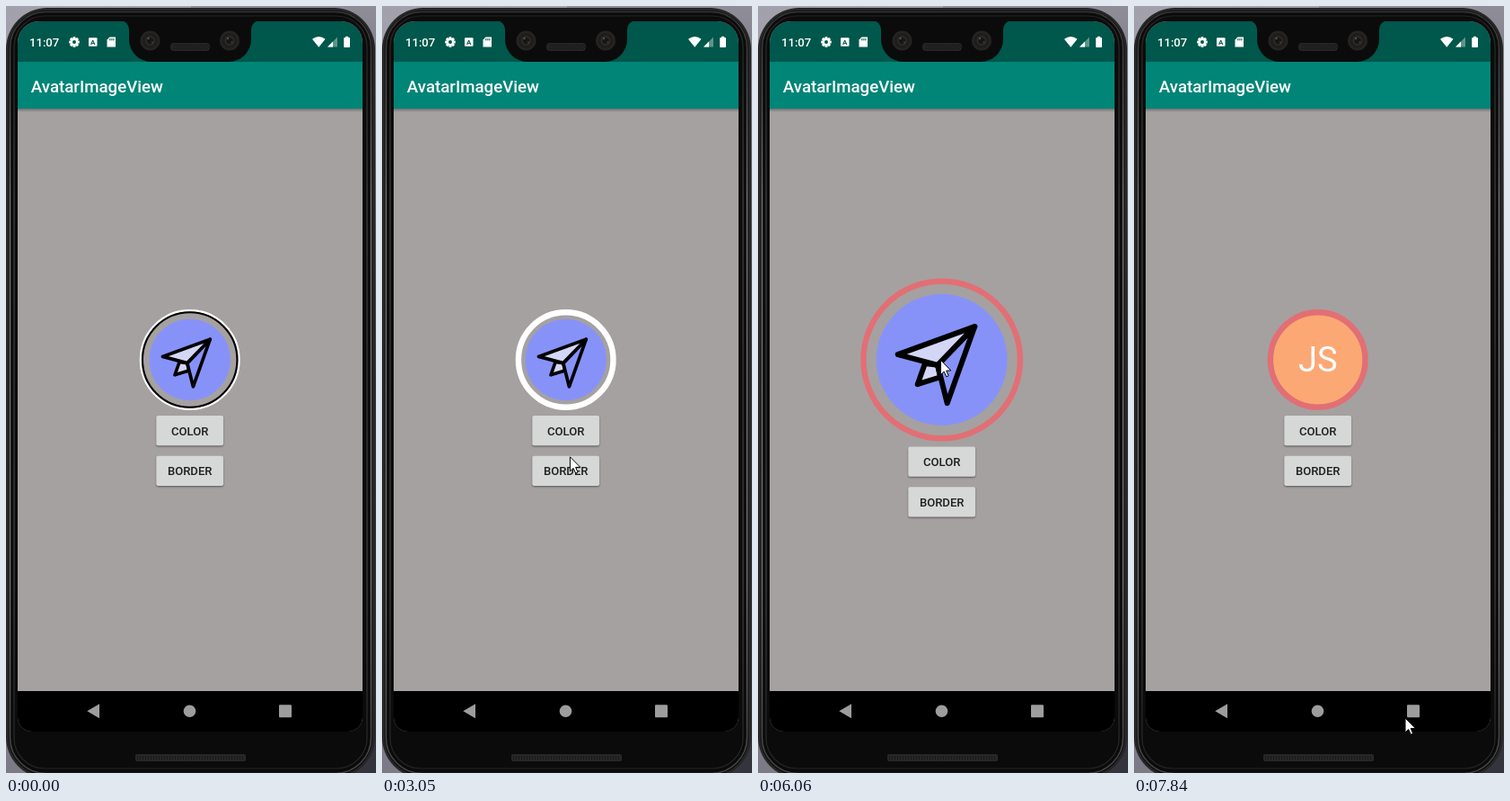
Write an HTML page with a canvas that moves like this. It is 412 px wide and 852 px high and loops after 8000 ms.

```html
<!DOCTYPE html>
<html lang="en">
<head>
<meta charset="utf-8">
<title>Avatar demo</title>
<style>
html, body { margin: 0; width: 100%; height: 100%; overflow: hidden; background: #111; }
canvas { display: block; width: 412px; height: 852px; }
</style>
</head>
<body>
<canvas id="stage" width="412" height="852"></canvas>
<script>
const W = 412, H = 852, LOOP = 8000;
const CX = 204.7, CY = 393, SMALL = 56, BIG = 90.5;
const FONT = 'Roboto, Arial, sans-serif';
let c;

// Pointer keyframes: time, x, y
const PATH = [
  [70, 313, 710], [330, 226, 530], [400, 217, 507], [470, 216, 517],
  [2900, 216, 517], [3240, 199, 477],
  [4270, 199, 477], [4500, 207, 507], [4830, 203, 393],
  [6830, 203, 393], [7200, 301, 691],
  [7360, 301, 691], [7840, 301.5, 790.5]
];
// Press times: down, up
const PRESSES = [[990, 1280], [2230, 2480], [3430, 3870], [5120, 5610], [6130, 6320]];

const within = (t, a, b) => t >= a && t < b;
const clamp = v => Math.max(0, Math.min(1, v));

function pointer(t) {
  if (t < PATH[0][0]) return null;
  for (let i = 1; i < PATH.length; i++) {
    const [ta, xa, ya] = PATH[i - 1], [tb, xb, yb] = PATH[i];
    if (t < tb) {
      const k = (t - ta) / (tb - ta), e = k * k * (3 - 2 * k);
      return [xa + (xb - xa) * e, ya + (yb - ya) * e];
    }
  }
  return PATH[PATH.length - 1].slice(1);
}

// Pulls back first, overshoots, then settles
function anticipateOvershoot(k) {
  const s = 7.9;
  if (k < .5) { const u = 2 * k; return .5 * u * u * ((s + 1) * u - s); }
  const u = 2 * k - 2;
  return .5 * (u * u * ((s + 1) * u + s) + 2);
}

function radius(t) {
  const grow = anticipateOvershoot(clamp((t - 5610) / 410));
  const shrink = anticipateOvershoot(clamp((t - 6530) / 410));
  return SMALL + (BIG - SMALL) * (grow - shrink);
}

function box(x, y, w, h, r, fill) {
  c.beginPath();
  c.roundRect(x, y, w, h, r);
  c.fillStyle = fill;
  c.fill();
}

function outline(x, y, w, h, r, color, width) {
  c.beginPath();
  c.roundRect(x, y, w, h, r);
  c.strokeStyle = color;
  c.lineWidth = width;
  c.stroke();
}

function disc(x, y, r, fill) {
  c.beginPath();
  c.arc(x, y, r, 0, 7);
  c.fillStyle = fill;
  c.fill();
}

function band(outer, inner, color) {
  c.beginPath();
  c.arc(CX, CY, (outer + inner) / 2, 0, 7);
  c.strokeStyle = color;
  c.lineWidth = outer - inner;
  c.stroke();
}

function poly(points, fill) {
  c.beginPath();
  points.forEach(([x, y]) => c.lineTo(x, y));
  c.closePath();
  if (fill) { c.fillStyle = fill; c.fill(); }
}

function text(str, x, y, size, weight, color, align = 'left') {
  c.font = `${weight} ${size}px ${FONT}`;
  c.textAlign = align;
  c.fillStyle = color;
  c.fillText(str, x, y);
}

function linear(x0, y0, x1, y1, ...stops) {
  const g = c.createLinearGradient(x0, y0, x1, y1);
  stops.forEach((s, i) => g.addColorStop(i / (stops.length - 1), s));
  return g;
}

function lens(x) {
  disc(x, 38.5, 11, '#262422');
  disc(x, 38.5, 8.5, '#1f1d1c');
  disc(x, 38.5, 5.5, '#2b2927');
  disc(x, 38.5, 3.5, '#171615');
  disc(x - 2, 36, 1.2, '#54504c');
  disc(x + 2.5, 40.5, .9, '#4b4845');
}

function body() {
  c.fillStyle = linear(0, 0, 0, H, '#a3a1ac', '#8b8995', '#7b7a86');
  c.fillRect(0, 0, W / 2, H);
  c.fillStyle = linear(0, 0, 0, H, '#8f8d98', '#3a3a44', '#34343e');
  c.fillRect(W / 2, 0, W / 2, H);
  box(0, 2, 411, 856, 46, '#262626');
  box(3, 5, 405, 850, 42, '#0b0b0b');
  outline(4.5, 6.5, 402, 846, 40, linear(0, 0, 0, H, '#333', '#777', '#777', '#777', '#444'), 1.4);
  outline(9, 11, 393, 836, 34, linear(0, 0, 0, H, '#222', '#444', '#3c3c3c', '#444', '#222'), 1.2);
  box(144, 831, 123, 8, 2, '#272727');
  c.fillStyle = '#191919';
  for (let x = 146; x < 266; x += 3) c.fillRect(x, 833, 1, 4);
}

function notch() {
  c.beginPath();
  c.moveTo(127, 16);
  c.arcTo(137, 17, 137, 28, 10);
  c.arcTo(137, 62, 165, 62, 25);
  c.arcTo(273, 62, 273, 30, 25);
  c.arcTo(273, 17, 283, 16, 10);
  c.lineTo(283, 16);
  c.fillStyle = '#0b0b0b';
  c.fill();
  lens(160.5);
  lens(249);
  box(183, 41, 44, 9, 4, '#242424');
  c.fillStyle = '#121212';
  for (let x = 186; x < 225; x += 2)
    for (let y = 43; y < 49; y += 2) c.fillRect(x + (y % 4 === 1), y, 1, 1);
}

function statusIcons() {
  text('11:07', 26, 45, 13.1, 500, '#fff');
  for (let i = 0; i < 8; i++) {
    c.save();
    c.translate(76, 40);
    c.rotate(i * Math.PI / 4);
    box(-1.5, -5.8, 3, 4, .6, '#fff');
    c.restore();
  }
  disc(76, 40, 4.4, '#fff');
  disc(76, 40, 2, '#00574b');
  box(92, 35.3, 9.5, 9.5, 1, '#fff');
  text('A', 96.7, 43, 8, 700, '#00574b', 'center');
  poly([[115.5, 34.5], [122, 34.5], [122, 45.5], [112.5, 45.5], [112.5, 37.5]], '#fff');
  c.fillStyle = '#00574b';
  for (let i = 0; i < 3; i++) c.fillRect(115.4 + i * 2, 36, 1, 2.4);

  c.beginPath();
  c.moveTo(348.3, 45.8);
  c.lineTo(341, 36.8);
  c.quadraticCurveTo(348.3, 31.2, 355.6, 36.8);
  c.fillStyle = '#fff';
  c.fill();
  poly([[369, 34.5], [369, 45.5], [358, 45.5]], '#5f928b');
  poly([[364, 39.5], [364, 45.5], [358, 45.5]], '#fff');
  box(376.2, 35, 6.8, 11, .8, '#fff');
  box(378, 33.8, 3.2, 2, 0, '#fff');
}

function screen() {
  c.save();
  c.beginPath();
  c.roundRect(13, 17, 384, 789, [24, 24, 16, 16]);
  c.clip();
  c.fillStyle = '#a5a1a0';
  c.fillRect(13, 17, 384, 789);
  c.fillStyle = linear(0, 114, 0, 118, 'rgba(0,0,0,.3)', 'rgba(0,0,0,0)');
  c.fillRect(13, 114, 384, 4);
  c.fillStyle = '#008577';
  c.fillRect(13, 62, 384, 52);
  c.fillStyle = '#00574b';
  c.fillRect(13, 17, 384, 45);
  c.fillStyle = '#000';
  c.fillRect(13, 761, 384, 45);
  c.restore();

  notch();
  statusIcons();
  text('AvatarImageView', 27.8, 96, 18.7, 500, '#fff');
  poly([[90.3, 783.2], [104, 775.2], [104, 791.2]], '#9d9d9d');
  disc(204.5, 783.2, 6.8, '#9d9d9d');
  box(304, 776.3, 14, 14, 1, '#9d9d9d');
}

function button(label, y, dark) {
  c.save();
  c.shadowColor = 'rgba(0,0,0,.4)';
  c.shadowBlur = 2;
  c.shadowOffsetY = 1.2;
  box(167.3, y, 74.7, 33.3, 2, dark ? '#c8cbca' : '#d6d8d7');
  c.restore();
  text(label, CX, y + 21.5, 13.1, 500, '#1f1f1f', 'center');
}

function plane(k) {
  const tip = [22.6, -22.8], left = [-30.3, -3.6], mid = [-2.9, 3.6],
        low = [3.7, 29.8], finA = [-11.6, 2.5], finB = [-16.7, 16.8], finC = [-1, 11.9];
  c.save();
  c.translate(CX, CY);
  c.scale(k, k);
  c.lineJoin = c.lineCap = 'round';
  c.strokeStyle = '#000';
  c.lineWidth = 3.7;
  poly([mid, finA, finB, finC], '#d3d7f5');
  c.stroke();
  poly([tip, mid, low], '#8792f9');
  c.stroke();
  poly([tip, left, mid], '#d3d7f5');
  c.stroke();
  c.restore();
}

function avatar(t, r) {
  const k = r / SMALL;
  if (t < 6440) {
    disc(CX, CY, r * .806, '#8792f9');
    plane(k);
  } else {
    disc(CX, CY, r - 6, '#fba875');
    text('JS', CX, CY + r * .237, r * .68, 400, '#fff', 'center');
  }
  if (t < 1280) {
    band(r, r - 2.2, '#fff');
    band(r - 2.2, r - 4.3, '#000');
  } else if (t < 2480) {
    band(r, r - 3, '#fff');
    band(r - 3, r - 4.2, '#000');
  } else {
    band(r, r - 6.4, t < 3870 ? '#fff' : '#e26f75');
  }
}

function arrow([x, y]) {
  c.save();
  c.translate(x + .5, y + .5);
  c.lineJoin = 'miter';
  poly([[0, 0], [0, 16], [3.7, 12.6], [6.3, 18.3], [8.7, 17.2], [6.2, 11.6], [11.3, 11.4]], '#fff');
  c.strokeStyle = '#000';
  c.lineWidth = 1;
  c.stroke();
  c.restore();
}

function draw(t) {
  const r = radius(t), shift = r - SMALL, spot = pointer(t);
  c.drawImage(backdrop, 0, 0);
  avatar(t, r);
  button('COLOR', 455 + shift, within(t, 3490, 4310));
  button('BORDER', 499.7 + shift, within(t, 1050, 1520) || within(t, 2290, 2670));
  if (spot) arrow(spot);
  if (PRESSES.some(([a, b]) => within(t, a, b))) disc(spot[0], spot[1], 15, 'rgba(245,240,20,.57)');
}

const backdrop = document.createElement('canvas');
backdrop.width = W;
backdrop.height = H;
c = backdrop.getContext('2d');
body();
screen();

c = document.getElementById('stage').getContext('2d');
const start = performance.now();
function tick() {
  draw((performance.now() - start) % LOOP);
  requestAnimationFrame(tick);
}
tick();
</script>
</body>
</html>
```
